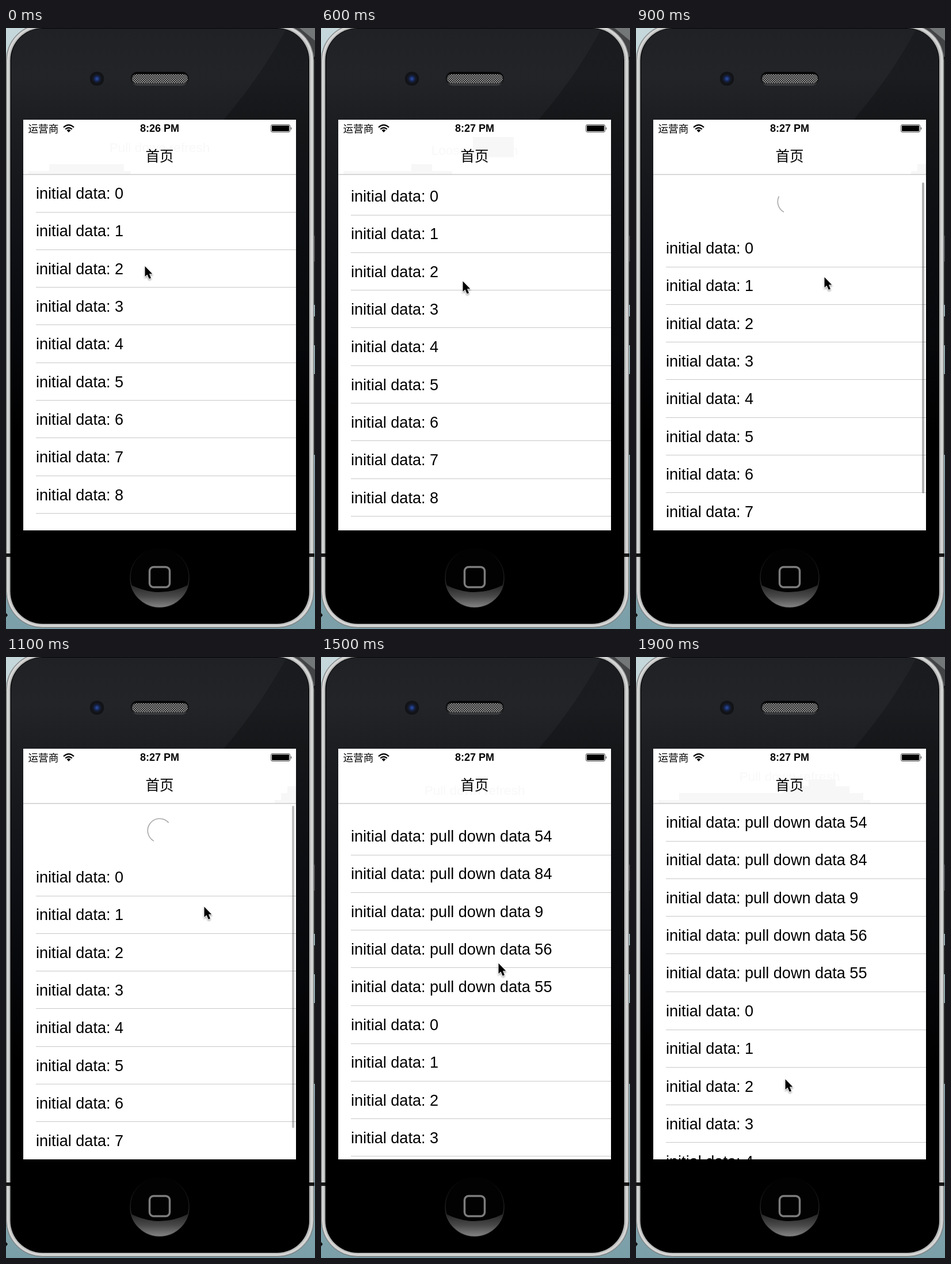
Write an HTML page that moves like this. It is 537 px wide and 1042 px high and loops after 2400 ms.

```html
<!DOCTYPE html>
<html lang="en">
<head>
<meta charset="utf-8">
<title>Pull to refresh</title>
<style>
html, body { margin: 0; width: 100%; height: 100%; overflow: hidden; background: #000; }
svg { display: block; width: 100%; height: 100%; }
text { font-family: "Liberation Sans", Arial, sans-serif; }
.cjk { font-family: "Noto Sans CJK SC", "Noto Sans CJK", sans-serif; }
.row { font-size: 27.1px; }
</style>
</head>
<body>
<svg viewBox="0 0 537 1042" preserveAspectRatio="none">
  <defs>
    <linearGradient id="desktop" x2="0" y2="1">
      <stop offset="0" stop-color="#c6d8db"/>
      <stop offset=".5" stop-color="#9dbcc2"/>
      <stop offset="1" stop-color="#7b9fa8"/>
    </linearGradient>
    <linearGradient id="glass" x2="0" y2="1">
      <stop offset="0" stop-color="#1f2125"/>
      <stop offset=".08" stop-color="#222428"/>
      <stop offset=".15" stop-color="#1c1e21"/>
      <stop offset=".35" stop-color="#101217"/>
      <stop offset=".5" stop-color="#08090d"/>
      <stop offset=".68" stop-color="#000"/>
    </linearGradient>
    <linearGradient id="shade" x2="0" y2="1">
      <stop offset="0" stop-color="#08090a" stop-opacity=".25"/>
      <stop offset="1" stop-color="#08090a" stop-opacity=".6"/>
    </linearGradient>
    <linearGradient id="slot" x2="0" y2="1">
      <stop offset="0" stop-color="#050506"/>
      <stop offset=".8" stop-color="#1a1b1c"/>
      <stop offset="1" stop-color="#4a4c4f"/>
    </linearGradient>
    <linearGradient id="crescent" x2="0" y2="1">
      <stop offset="0" stop-color="#242424"/>
      <stop offset=".5" stop-color="#484848"/>
      <stop offset="1" stop-color="#858585"/>
    </linearGradient>
    <linearGradient id="buttonRim" x2="0" y2="1">
      <stop offset="0" stop-color="#000"/>
      <stop offset=".5" stop-color="#1c1c1c"/>
      <stop offset="1" stop-color="#606060"/>
    </linearGradient>
    <radialGradient id="lens">
      <stop offset="0" stop-color="#2f52a4"/>
      <stop offset=".35" stop-color="#1c3270"/>
      <stop offset=".7" stop-color="#141b30"/>
      <stop offset="1" stop-color="#14161c"/>
    </radialGradient>
    <pattern id="mesh" width="4" height="4" patternUnits="userSpaceOnUse">
      <path fill="#8c8c8c" d="M0 0h4v4H0z"/>
      <path fill="#2a2a2a" d="M0 0h2v2H0zM2 2h2v2H2z"/>
    </pattern>
    <clipPath id="screen"><path d="M30 159H504V871H30z"/></clipPath>
    <clipPath id="button"><circle cx="267" cy="953" r="51"/></clipPath>
    <clipPath id="face"><rect x="9" y="1" width="517" height="1031" rx="54"/></clipPath>
    <filter id="drop" x="-50%" y="-50%" width="200%" height="200%">
      <feDropShadow dx="0" dy="2" stdDeviation="1.5" flood-opacity=".4"/>
    </filter>
  </defs>

  <!-- desktop behind the phone -->
  <path fill="url(#desktop)" d="M0 0H537V1042H0z"/>
  <path fill="#424446" d="M470 0H537V480H470z"/>
  <path fill="#161819" d="M533 50h4V360h-4zM533 405h4v75h-4zM533 500h4v50h-4zM533 600h4V740h-4z"/>
  <path fill="#747778" d="M510 0h27v22z"/>
  <path fill="#0c0c0c" d="M0 1014l3 4-3 4z"/>

  <!-- phone body -->
  <rect x=".5" y="-6.500" width="534.500" height="1046" rx="63" fill="#b9baba" stroke="#6c6e6f"/>
  <rect x="3.500" y="-3.500" width="528" height="1040" rx="60" fill="none" stroke="#d6d7d6" stroke-width="3"/>
  <path fill="#161616" d="M0 911H9V917H0zM526 911h10v6h-10z"/>
  <rect x="7.500" y="0" width="519.500" height="1033" rx="56" fill="#000"/>
  <rect x="9" y="1" width="517" height="1031" rx="54" fill="url(#glass)"/>
  <path clip-path="url(#face)" fill="url(#shade)" d="M488 0H527V560H504V159H378Q442 85 488 0z"/>

  <circle cx="158" cy="88" r="13" fill="#121316" stroke="#25272a"/>
  <circle cx="158" cy="88" r="8.500" fill="url(#lens)"/>
  <rect x="216.500" y="76" width="101.500" height="23.500" rx="11.700" fill="url(#slot)"/>
  <rect x="219" y="80" width="97" height="16" rx="8" fill="url(#mesh)"/>

  <circle cx="267" cy="953" r="51" fill="#020202" stroke="url(#buttonRim)" stroke-width="1.500"/>
  <path clip-path="url(#button)" fill="url(#crescent)" d="M216 965Q267 991 318 965V1005H216z"/>
  <rect x="249.500" y="934.500" width="35" height="35" rx="7" fill="none" stroke="#7c7c7c" stroke-width="3.500"/>

  <g clip-path="url(#screen)">
    <path fill="#fff" d="M30 159H504V871H30z"/>
    <g id="list">
      <text id="hint" x="267" y="214.500" text-anchor="middle" font-size="22.6" fill="#aaa"></text>
      <g id="added"></g>
      <g id="initial"></g>
    </g>
    <path id="spinner" fill="none" stroke="#a6a6a6" stroke-width="1.600"/>
    <rect id="bar" x="497" width="4" rx="2" fill="#000"/>

    <path fill="#fff" fill-opacity=".92" d="M30 159H504V254H30z"/>
    <path id="tint" fill="#f7f7f7"/>
    <path fill="#b4b4b4" d="M30 253.500H504v1H30z"/>
    <text class="cjk" x="38.500" y="180.500" font-size="17.6">运营商</text>
    <g fill="none" stroke="#000" stroke-width="2.200">
      <path d="M100 172.200Q109 164.200 118 172.200M103.200 175.500Q109 170.500 114.800 175.500"/>
      <path fill="#000" stroke="none" d="M105.500 177.300Q109 174.300 112.500 177.300L109 181z"/>
    </g>
    <text id="clock" x="267" y="180" text-anchor="middle" font-size="18" font-weight="700"></text>
    <rect x="460.500" y="167.500" width="33" height="13" rx="2.500" fill="#fff" stroke="#444"/>
    <rect x="462" y="169" width="30" height="10" rx="1"/>
    <path d="M495.200 171.500q2 2.500 0 5.500z"/>
    <text class="cjk" x="267" y="230.500" text-anchor="middle" font-size="24.5" font-weight="500">首页</text>
  </g>

  <path id="cursor" filter="url(#drop)" stroke="#fff" stroke-width="1.400" paint-order="stroke"
    d="M.5 1V19L4.500 15.500L7.700 22.800L11 21.400L8 14.200H13.300z"/>
</svg>

<script>
const LOOP = 2400, ROW = 65.33;
const $ = id => document.getElementById(id);

// start ms, list offset, cursor x, cursor y
const steps = [
  [0, 0, 241, 412], [300, 0, 241, 414], [400, 1, 243, 423], [500, 3, 245, 431],
  [600, 5, 246, 438], [800, 95, 308, 433], [900, 95, 327, 431], [1000, 95, 337, 431],
  [1100, 95, 344, 432], [1200, 95, 345, 438], [1300, 95, 338, 462], [1400, 83, 325, 491],
  [1500, 24, 308, 530], [1600, 0, 290, 573], [1700, 0, 280, 622], [1800, 0, 268, 684],
  [1900, 0, 259, 731]
];

// faint bleed of the list through the translucent header
const tints = [
  [0, "M75 236h130v12h12v6H39v-6h36z"],
  [600, "M264 189h71v35h-71zM157 236h36v12h35v6H39v-6h118z"],
  [800, "M489 236h15v18h-26v-6h11z"],
  [1000, "M489 224h15v30h-37v-6h11v-12h11z"],
  [1300, ""],
  [1600, "M300 212h47v12h24v12h24v12h12v6H39v-6h36v-12h181v-12h44z"]
];

const current = (table, t) => table.findLast(entry => entry[0] <= t);

const makeRows = labels => labels.map((label, i) => {
  const y = i * ROW;
  return `<text class="row" x="52" y="${296 + y}">initial data: ${label}</text>
    <path fill="#c8c8c8" d="M52 ${Math.round(318.5 + y)}H504v1H52z"/>`;
}).join("");

$("added").innerHTML = makeRows([54, 84, 9, 56, 55].map(n => "pull down data " + n));
$("initial").innerHTML = makeRows([0, 1, 2, 3, 4, 5, 6, 7, 8]);

function arc(sweep) {
  const point = degrees => {
    const a = degrees * Math.PI / 180;
    return `${267 + 20.7 * Math.cos(a)} ${301 + 20.7 * Math.sin(a)}`;
  };
  return `M${point(119)}A20.7 20.7 0 ${sweep > 180 ? 1 : 0} 1 ${point(119 + sweep)}`;
}

const show = (id, visible) => $(id).setAttribute("display", visible ? "inline" : "none");
const move = (id, x, y) => $(id).setAttribute("transform", `translate(${x} ${y})`);

function draw(t) {
  const [start, offset, x, y] = current(steps, t);
  const loading = start >= 800 && start < 1400;
  const loaded = start >= 1400;
  const elapsed = (start - 800) / 100;

  move("list", 0, offset);
  move("cursor", x, y);
  move("initial", 0, loaded ? Math.round(5 * ROW) : 0);
  show("added", loaded);
  show("hint", !loading);
  show("spinner", loading);
  show("bar", loading && start < 1300);

  $("hint").textContent = start === 600 ? "Loosen refresh" : "Pull down refresh";
  $("clock").textContent = start < 300 ? "8:26 PM" : "8:27 PM";
  $("tint").setAttribute("d", current(tints, t)[1]);

  if (loading) {
    const half = Math.min(281, 264.5 + 5 * elapsed);
    $("spinner").setAttribute("d", arc(31 + 56.3 * elapsed));
    $("bar").setAttribute("y", 537.3 - half);
    $("bar").setAttribute("height", 2 * half);
    $("bar").setAttribute("opacity", start < 1200 ? 0.34 - 0.03 * elapsed : 0.12);
  }
}

const origin = performance.now();
function tick() {
  draw((performance.now() - origin) % LOOP);
  requestAnimationFrame(tick);
}
tick();
</script>
</body>
</html>
```
